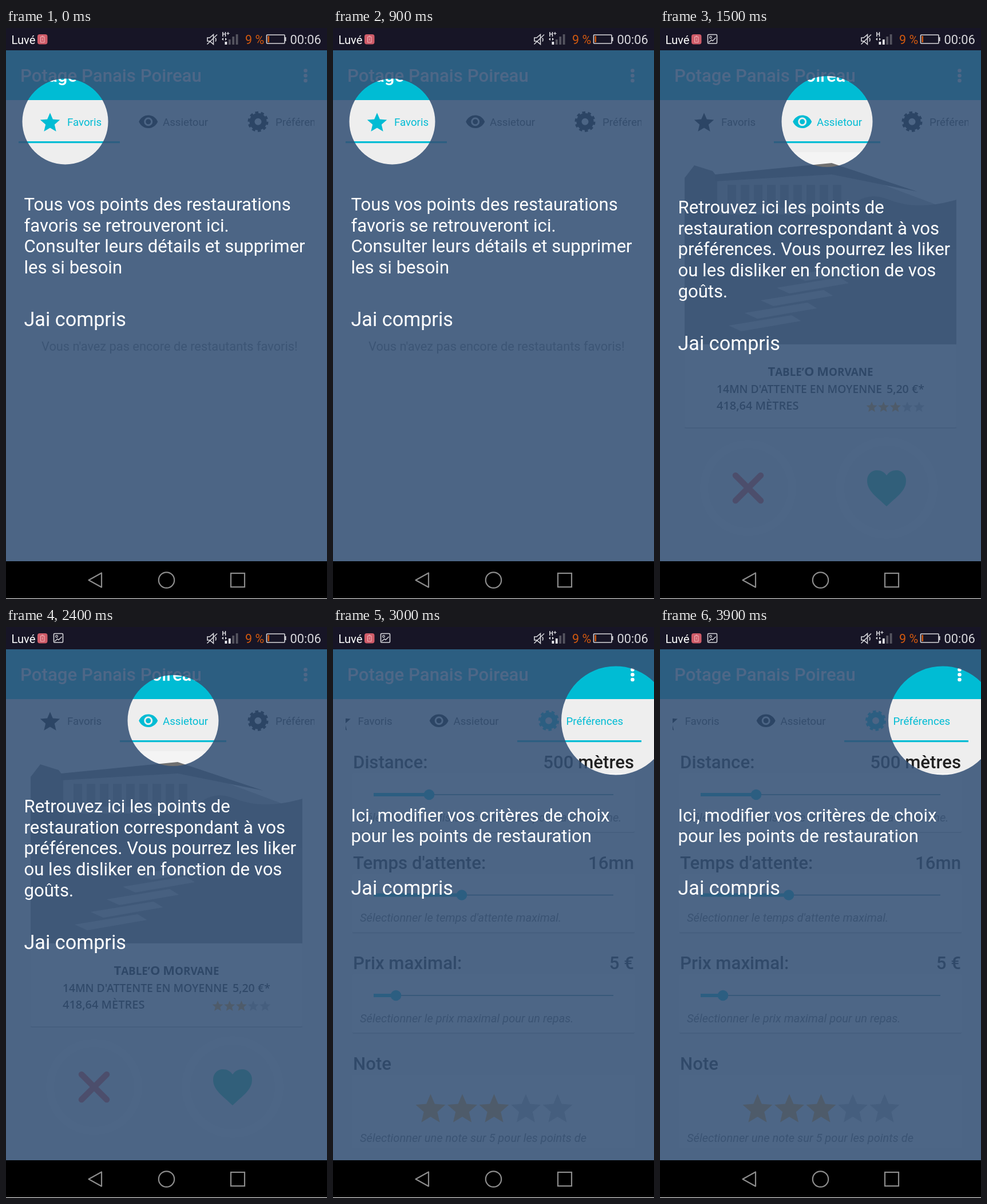
Animation of 561 by 998 pixels, one loop 4500 ms. Source, as an HTML page:

```html
<!DOCTYPE html>
<html lang="fr">
<head>
<meta charset="utf-8">
<title>Visite guidée</title>
<style>
  html, body { margin: 0; width: 100%; height: 100%; overflow: hidden; background: #000; }
  svg { display: block; width: 561px; height: 998px; font-family: Roboto, "Noto Sans", sans-serif; }
  text { white-space: pre; }
  .card { font-family: "Open Sans", "Noto Sans", sans-serif; font-weight: 600; }
</style>
</head>
<body>
<svg id="stage" viewBox="0 0 561 998" xmlns="http://www.w3.org/2000/svg"></svg>
<script>
const CYAN = '#00bcd4', INK = '#212121', STEP = 1500, LOOP = 3 * STEP;

const text = (x, y, size, fill, str, extra = '') =>
  `<text x="${x}" y="${y}" font-size="${size}" fill="${fill}" ${extra}>${str}</text>`;
const rect = (x, y, w, h, fill, extra = '') =>
  `<rect x="${x}" y="${y}" width="${w}" height="${h}" fill="${fill}" ${extra}/>`;
const circle = (x, y, r, fill, extra = '') =>
  `<circle cx="${x}" cy="${y}" r="${r}" fill="${fill}" ${extra}/>`;
const path = (d, fill, extra = '') => `<path d="${d}" fill="${fill}" ${extra}/>`;
const line = (d, stroke, width, extra = '') =>
  path(d, 'none', `stroke="${stroke}" stroke-width="${width}" ${extra}`);

const star = (x, y, s, fill) =>
  path('M12 17.27 18.18 21l-1.64-7.03L22 9.24l-7.19-.61L12 2 9.19 8.63 2 9.24l5.46 4.73L5.82 21z',
    fill, `transform="translate(${x} ${y}) scale(${s}) translate(-12 -11.5)"`);
const eye = (x, y, fill) =>
  path('M12 4.5C7 4.5 2.73 7.61 1 12c1.73 4.39 6 7.5 11 7.5s9.27-3.11 11-7.5c-1.73-4.39-6-7.5-11-7.5z' +
    'M12 17a5 5 0 1 1 0-10 5 5 0 0 1 0 10zM12 9a3 3 0 1 0 0 6 3 3 0 0 0 0-6z',
    fill, `fill-rule="evenodd" transform="translate(${x} ${y}) scale(1.5) translate(-12 -12)"`);
const gear = (x, y, color) =>
  circle(x, y, 10.5, 'none', `stroke="${color}" stroke-width="9"`) +
  circle(x, y, 15.5, 'none', `stroke="${color}" stroke-width="5" pathLength="20" stroke-dasharray="1.1 .9"`);
const rating = (x, y, gap, s) =>
  [0, 1, 2, 3, 4].map(i => star(x + i * gap, y, s, i < 3 ? '#ffa726' : '#bdbdbd')).join('');

function toolbar() {
  return rect(0, 39, 561, 87, CYAN) +
    text(25, 94, 31.2, '#fff', 'Potage Panais Poireau', 'font-weight="500"') +
    [74.5, 83.2, 92].map(y => circle(523.5, y, 3.3, '#fff')).join('');
}

function tabs(active, shift, barX, barW) {
  const icon = i => i === active ? CYAN : '#000';
  const label = (i, x, str) => text(x, 171, 18.7, i === active ? CYAN : '#3c3c3c', str);
  return `<g clip-path="url(#tabs)"><g transform="translate(${shift} 0)">` +
    star(77, 164.5, 1.72, icon(0)) + label(0, 107, 'Favoris') +
    eye(248.7, 163.7, icon(1)) + label(1, 274, 'Assietour') +
    gear(440.5, 163.7, icon(2)) + label(2, 471, 'Préférences') +
    `</g>${rect(barX, 198, barW, 3.2, CYAN)}</g>`;
}

function photo() {
  let s = rect(43, 217, 475, 336, '#f4f4f4');
  s += path('M43 262 60 240 92 250 118 284 122 400H43z', '#777');
  s += path('M100 258 300 240 518 322V400H100z', '#b5b5b5');
  s += path('M96 256 300 236 450 286 300 256 96 268z', '#707070');
  for (let i = 0; i < 9; i++) s += rect(118 + i * 23, 274, 15, 40, '#888');
  s += rect(100, 326, 250, 60, '#858585');
  s += path('M320 330Q350 280 400 300T518 300V400H320z', '#8b8b8b');
  s += rect(43, 386, 475, 167, '#929292');
  for (let i = 0; i < 5; i++)
    s += path(`M${120 + i * 28} ${520 - i * 22}l110-18 16 10-104 18z`, '#c8c8c8');
  return s;
}

function cardPage() {
  return rect(43, 219, 475, 481, '#c4c4c4', 'rx="2"') + rect(43, 217, 475, 481, '#fbfbfb', 'rx="2"') + photo() +
    `<g class="card">` +
    text(280.5, 608, 18.8, '#111',
      '<tspan font-size="22">T</tspan>ABLE’<tspan font-size="22">O</tspan> <tspan font-size="22">M</tspan>ORVANE',
      'text-anchor="middle" font-weight="700"') +
    text(99, 638, 19.2, INK, "14MN D'ATTENTE EN MOYENNE") +
    text(462, 638, 19.6, INK, '5,20 €*', 'text-anchor="end"') +
    text(99, 667, 20, INK, '418,64 MÈTRES') + '</g>' +
    rating(370, 662, 20.7, 0.95) +
    circle(154, 804, 84, '#f8f8f8') + circle(154, 804, 70, '#eee') +
    circle(396, 804, 89, '#f8f8f8') + circle(396, 804, 74, '#eee') +
    line('M132 782l44 44m0-44-44 44', '#f44336', 10.5, 'stroke-linecap="round"') +
    path('M396 836C378 819 362 809 362 791c0-11 8-18 17-18 7 0 13 3 17 9 4-6 10-9 17-9 9 0 17 7 17 18 0 18-16 28-34 45z', '#26c6a0');
}

function prefsPage() {
  const rows = [
    ['Distance:', '500 mètres', 168, 'Sélectionner la distance maximale pour la recherche.'],
    ["Temps d'attente:", '16mn', 225, "Sélectionner le temps d'attente maximal."],
    ['Prix maximal:', '5 €', 110, 'Sélectionner le prix maximal pour un repas.'],
    ['Note', '', 0, 'Sélectionner une note sur 5 pour les points de']
  ];
  const head = 'font-weight="500"', hint = 'font-style="italic"';
  return '<g clip-path="url(#prefs)">' + rows.map(([name, value, knob, tip], i) => {
    const y = i * 175.5, tall = i === 3 ? 200 : 102, tipY = i === 3 ? 900 : 339.5 + y;
    return rect(34, 258 + y, 493, tall, '#c0c0c0', 'rx="2"') +
      rect(34, 256 + y, 493, tall, '#f8f8f8', 'rx="2"') +
      text(35, 247 + y, 31.2, INK, name, head) +
      text(526, 247 + y, 31.2, INK, value, head + ' text-anchor="end"') +
      (knob ? rect(71, 292.3 + y, 419, 1.4, '#1a6a78') + rect(71, 290 + y, knob - 71, 6, CYAN) +
        circle(knob, 293 + y, 9.3, CYAN) : '') +
      text(47, tipY, 20.1, '#666', tip, hint);
  }).join('') + rating(170.5, 841, 55.5, 2.6) +
    text(47, 925, 20.1, '#666', 'restauration.', hint) + '</g>';
}

function overlay(x, y, r, firstLine, lines, okY) {
  return path(`M0 39H561V932H0zM${x - r} ${y}a${r} ${r} 0 1 0 ${2 * r} 0a${r} ${r} 0 1 0 ${-2 * r} 0z`,
    '#335075', 'fill-opacity=".867" fill-rule="evenodd"') +
    lines.map((str, i) => text(31.5, firstLine + i * 36.7, 31.1, '#fff', str)).join('') +
    text(31.5, okY, 34.2, '#fff', 'Jai compris');
}

function statusBar() {
  return rect(0, 0, 561, 39, '#171526') +
    text(9.5, 28, 20.2, '#fff', 'Luvé') +
    rect(55, 11, 17.5, 17.5, '#cf5c69', 'rx="4"') +
    line('M60.5 15.5h6.5v9.5h-6.5zM62.5 14h2.5M63.7 18v4', '#f0b4ba', 1) +
    line('M352 17h4l6.5-5.5v17L356 23h-4zM351.5 28.5 369 11.5M366 17.5q2 3 0 6', '#d8d8dc', 1.6) +
    path('M377 19.5l3-2.5v5zM386 19.5l-3-2.5v5z', '#e0e0e4') +
    text(418, 28, 21.5, '#d2590f', '9 %') +
    rect(455.5, 12, 31.5, 15, 'none', 'stroke="#d8d8dc" stroke-width="1.6" rx="1"') +
    rect(487.5, 16, 2, 7, '#d8d8dc') + rect(457.5, 14, 2.5, 11, '#d2590f') +
    text(496.5, 28, 21.8, '#d8d8dc', '00:06');
}

function status(hplus, bars, picture) {
  return text(377.5, 15, 10.5, '#e8e8ec', 'H', 'font-weight="700"') +
    (hplus ? line('M385.5 9.5h5M388 7v5', '#e8e8ec', 1.2) : '') +
    [5, 9, 14, 18].map((h, i) =>
      rect(382.5 + i * 6.4, 29 - h, 3.8, h, i < bars ? '#e8e8ec' : '#55545f')).join('') +
    (picture ? rect(83.5, 11.5, 16, 15.5, 'none', 'stroke="#d8d8dc" stroke-width="1.6" rx="1.5"') +
      circle(88.5, 16.5, 1.8, 'none', 'stroke="#d8d8dc" stroke-width="1.2"') +
      line('M85 25l5-4 2 1.5 5.5-5.5', '#d8d8dc', 1.4) : '');
}

function navBar() {
  const grey = 'stroke="#8c8c8c" stroke-width="2.2"';
  return rect(0, 932, 561, 66, '#000') +
    path('M144.5 965 167 952.5v25z', 'none', grey + ' stroke-linejoin="round"') +
    circle(280.5, 965, 13.7, 'none', grey) +
    rect(393, 953, 24, 24, 'none', grey) + rect(0, 997, 561, 1, '#fff');
}

const scenes = [
  toolbar() + text(62, 564, 21.8, '#757575', "Vous n'avez pas encore de restautants favoris!") +
    tabs(0, 0, 22, 177) +
    overlay(103.5, 163.5, 75, 319, ['Tous vos points des restaurations', 'favoris se retrouveront ici.',
      'Consulter leurs détails et supprimer', 'les si besoin'], 521) +
    status(true, 1, false),
  toolbar() + cardPage() + tabs(1, 0, 199, 186) +
    overlay(292, 163.5, 79.5, 324, ['Retrouvez ici les points de', 'restauration correspondant à vos',
      'préférences. Vous pourrez les liker', 'ou les disliker en fonction de vos', 'goûts.'], 562.5) +
    status(false, 2, true),
  toolbar() + prefsPage() + tabs(2, -63.5, 322, 217) +
    overlay(494, 163.5, 95, 339.5, ['Ici, modifier vos critères de choix', 'pour les points de restauration'], 467.5) +
    status(true, 2, true)
];

const stage = document.getElementById('stage');
stage.innerHTML =
  `<defs><clipPath id="tabs">${rect(22, 126, 517, 80, '#000')}</clipPath>` +
  `<clipPath id="prefs">${rect(0, 206, 561, 705, '#000')}</clipPath></defs>` +
  rect(0, 0, 561, 998, '#eee') + statusBar() +
  scenes.map(s => `<g class="scene" visibility="hidden">${s}</g>`).join('') + navBar();

const groups = stage.querySelectorAll('.scene');
const start = performance.now();
function draw() {
  const now = Math.floor((performance.now() - start) % LOOP / STEP);
  groups.forEach((g, i) => g.setAttribute('visibility', i === now ? 'visible' : 'hidden'));
  requestAnimationFrame(draw);
}
draw();
</script>
</body>
</html>
```
